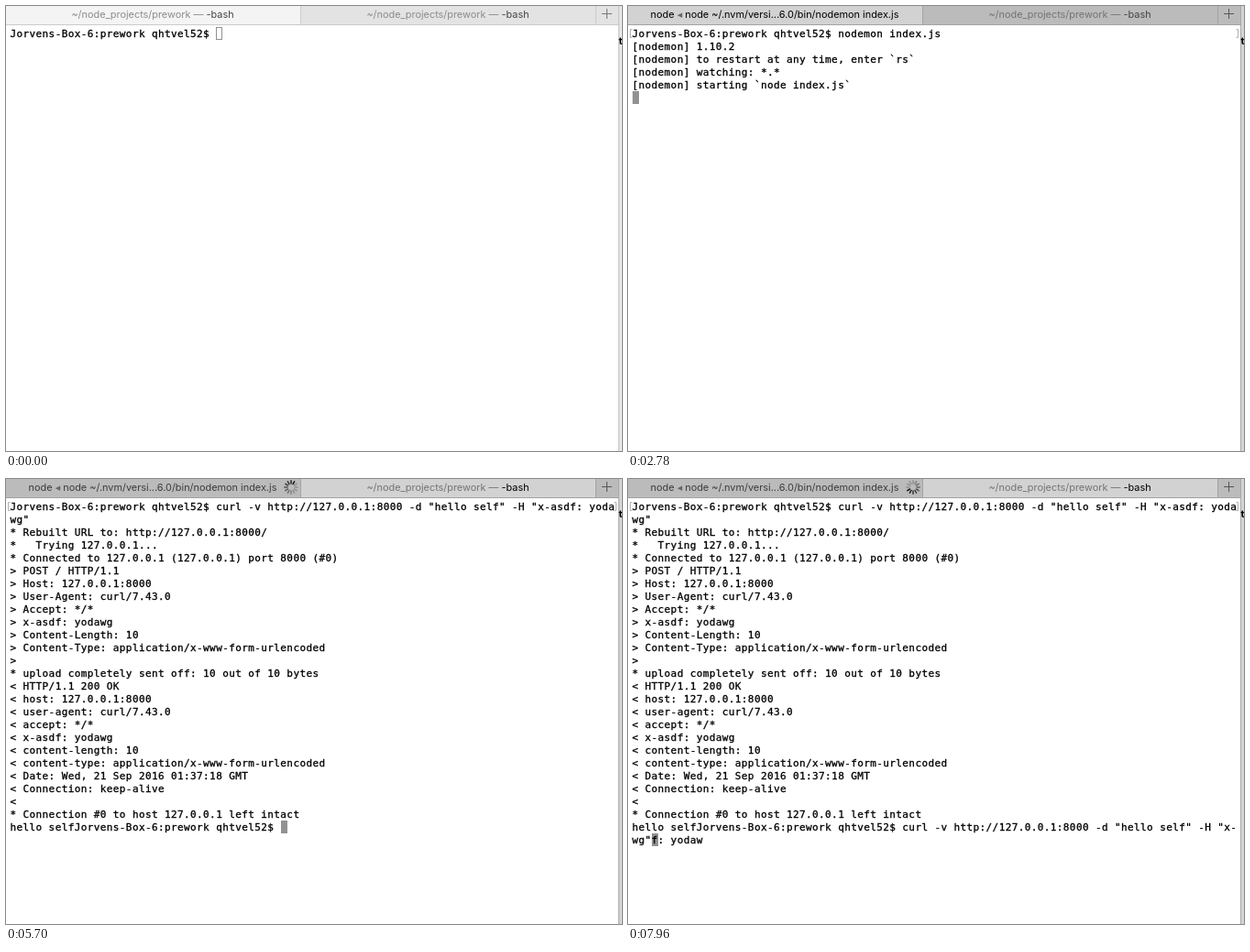
An HTML page with a canvas that plays this animation: 672 by 486 pixels, repeating every 8000 ms.

```html
<!DOCTYPE html>
<html lang="en">
<head>
<meta charset="utf-8">
<title>Terminal session</title>
<style>
html, body { margin: 0; width: 100%; height: 100%; overflow: hidden; background: #fff; }
canvas { display: block; }
</style>
</head>
<body>
<canvas id="stage" width="672" height="486"></canvas>
<script>
const ctx = document.getElementById('stage').getContext('2d');
const LOOP = 8000;
const COLS = 94, CHAR_W = 7.02, LINE_H = 14, LEFT = 4.3;
const MONO = '11px "DejaVu Sans Mono", monospace';
const SANS = '10.9px Inter, "DejaVu Sans", sans-serif';

// Moments of each hard change, in ms
const AT = { focus: 40, type: 780, resume: 1170, run: 1880, log: 2400, swap: 3200,
             recall: 4000, send: 5700, again: 7350 };

const PROMPT = 'Jorvens-Box-6:prework qhtvel52$ ';
const START = 'nodemon index.js';
const CURL = 'curl -v http://127.0.0.1:8000 -d "hello self" -H "x-asdf: yodawg"';
const NODEMON = [
  '[nodemon] 1.10.2',
  '[nodemon] to restart at any time, enter `rs`',
  '[nodemon] watching: *.*',
  '[nodemon] starting `node index.js`'
];
const RESPONSE = `* Rebuilt URL to: http://127.0.0.1:8000/
*   Trying 127.0.0.1...
* Connected to 127.0.0.1 (127.0.0.1) port 8000 (#0)
> POST / HTTP/1.1
> Host: 127.0.0.1:8000
> User-Agent: curl/7.43.0
> Accept: */*
> x-asdf: yodawg
> Content-Length: 10
> Content-Type: application/x-www-form-urlencoded
>
* upload completely sent off: 10 out of 10 bytes
< HTTP/1.1 200 OK
< host: 127.0.0.1:8000
< user-agent: curl/7.43.0
< accept: */*
< x-asdf: yodawg
< content-length: 10
< content-type: application/x-www-form-urlencoded
< Date: Wed, 21 Sep 2016 01:37:18 GMT
< Connection: keep-alive
<
* Connection #0 to host 127.0.0.1 left intact`.split('\n');

function rect(color, x, y, w, h) {
  ctx.fillStyle = color;
  ctx.fillRect(x, y, w, h);
}

const wrap = text => [text.slice(0, COLS), text.slice(COLS)];

function typedCount(t) {
  if (t < AT.type) return 0;
  if (t < 830) return 2;
  if (t < 870) return 4;
  if (t < AT.resume) return 5;
  return Math.min(START.length, 6 + Math.floor((t - AT.resume) / 50));
}

// Lines on screen, cursor cell and whether the first command has been entered
function session(t) {
  if (t < AT.swap) {
    const line = PROMPT + START.slice(0, typedCount(t));
    if (t < AT.run) return { lines: [line], col: line.length, row: 0 };
    const log = t < AT.log ? [] : NODEMON;
    return { lines: [line, ...log], col: 0, row: 1 + log.length, entered: true };
  }
  if (t < AT.recall) return { lines: [PROMPT], col: PROMPT.length, row: 0 };
  const command = wrap(PROMPT + CURL);
  if (t < AT.send) return { lines: command, col: 3, row: 1 };

  const reply = 'hello self' + PROMPT;
  const lines = [...command, ...RESPONSE];
  const row = lines.length;
  if (t < AT.again) return { lines: [...lines, reply], col: reply.length, row, entered: true };
  // The shell misjudges the wrap, so the tail overwrites the start of the row
  const [head, rest] = wrap(reply + CURL);
  const tail = 'wg"' + rest.slice(3, -2);
  return { lines: [...lines, head, tail], col: 3, row: row + 1, entered: true };
}

function drawCursor(col, row, focused) {
  const x = Math.round(LEFT + col * CHAR_W + .4), y = 23 + row * LINE_H;
  if (focused) return rect('#929292', x, y, 7, 14);
  ctx.strokeStyle = '#919191';
  ctx.strokeRect(x + .5, y + .5, 6, 13);
}

function drawBrackets() {
  ctx.strokeStyle = '#b0b0b0';
  ctx.beginPath();
  for (const [x, d] of [[2.5, 2], [665.5, -2]]) {
    ctx.moveTo(x + d, 25.5);
    ctx.lineTo(x, 25.5);
    ctx.lineTo(x, 34.5);
    ctx.lineTo(x + d, 34.5);
  }
  ctx.stroke();
}

function drawScreen(t, focused) {
  const { lines, col, row, entered } = session(t);
  if (entered) drawBrackets();
  drawCursor(col, row, focused);
  ctx.font = MONO;
  ctx.fillStyle = ctx.strokeStyle = '#000';
  ctx.lineWidth = .3; // a thin outline gives the slightly heavy smoothing
  lines.forEach((line, r) => [...line].forEach((ch, c) => {
    const x = LEFT + c * CHAR_W + .2, y = 34 + r * LINE_H;
    ctx.fillText(ch, x, y);
    ctx.strokeText(ch, x, y);
  }));
}

// Draws coloured pieces of text centred as one title
function drawTitle(center, ...parts) {
  ctx.font = SANS;
  const widths = parts.map(([text]) => ctx.measureText(text).width);
  let x = center - widths.reduce((a, b) => a + b) / 2;
  parts.forEach(([text, color], i) => {
    ctx.fillStyle = color;
    ctx.fillText(text, x, 13);
    x += widths[i];
  });
}

function drawSpinner(t) {
  const head = (t / 1000 * 1.15 + .57) % 1 * 12 | 0;
  ctx.save();
  ctx.translate(311, 9);
  ctx.lineWidth = 1.5;
  ctx.lineCap = 'round';
  for (let i = 0; i < 12; i++) {
    const age = (head - i + 12) % 12;
    ctx.strokeStyle = `rgba(20,20,20,${Math.max(.25, 1 - age * .09)})`;
    ctx.beginPath();
    ctx.moveTo(0, -4);
    ctx.lineTo(0, -7.2);
    ctx.stroke();
    ctx.rotate(Math.PI / 6);
  }
  ctx.restore();
}

function drawTabs(t, focused) {
  const second = t >= AT.swap;
  const on = focused ? '#d2d2d2' : '#f4f4f4', off = focused ? '#bbb' : '#e3e3e3';
  const line = focused ? '#a3a3a3' : '#cbcbcb';
  rect(second ? off : on, 0, 0, 321, 20);
  rect(second ? on : off, 321, 0, 322, 20);
  rect(off, 643, 0, 25, 20);
  rect(line, 0, 20, 668, 1);
  rect(line, 321, 0, 1, 20);
  rect(line, 643, 0, 1, 20);

  const grey = focused ? '#747474' : '#8c8c8c';
  const shell = (center, active) => drawTitle(center,
    ['~/node_projects/prework — ', grey], ['-bash', focused && active ? '#000' : '#444']);
  const ink = second ? '#3c3c3c' : '#000';
  if (t < AT.run) shell(160, true);
  else if (t < AT.log) drawTitle(160, ['node ~/.nvm/versions/no....6.0/bin/nodemon index.js', ink]);
  else drawTitle(160, ['node ', ink], ['◂', '#666'],
    [' node ~/.nvm/versi...6.0/bin/nodemon index.js', ink]);
  shell(482, second);
  if (second) drawSpinner(t);

  const plus = focused ? '#555' : '#777';
  rect(plus, 650, 8, 11, 1);
  rect(plus, 655, 3, 1, 11);
}

function drawEdge(focused) {
  rect(focused ? '#a8a8a8' : '#c4c4c4', 668, 0, 1, 486);
  rect(focused ? '#d4d4d4' : '#e6e6e6', 669, 0, 3, 486);
  ctx.font = 'bold 11px Inter, sans-serif';
  ctx.fillStyle = '#000';
  ctx.fillText('t', 668.5, 42);
}

function draw(t) {
  const focused = t >= AT.focus;
  ctx.lineWidth = 1;
  rect('#fff', 0, 0, 672, 486);
  drawScreen(t, focused);
  drawTabs(t, focused);
  drawEdge(focused);
}

const begin = performance.now();
function tick() {
  draw((performance.now() - begin) % LOOP);
  requestAnimationFrame(tick);
}
tick();
</script>
</body>
</html>
```
